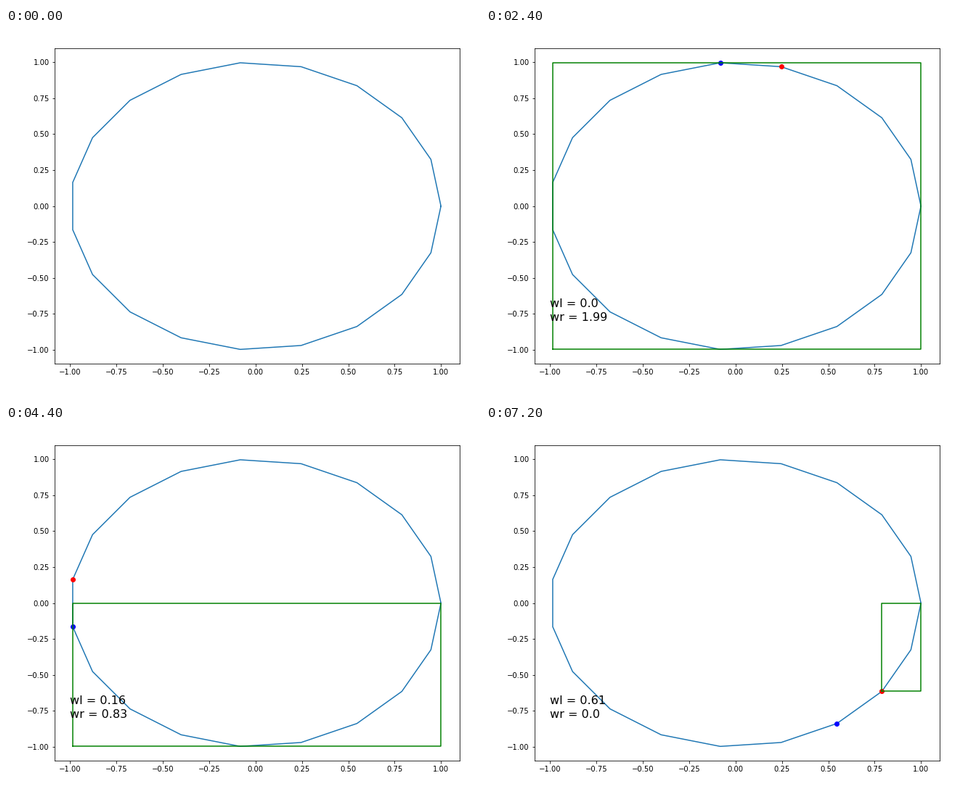
A matplotlib script for the animation above (7600 ms loop, 653x509 px).

```python
import numpy as np
import matplotlib.pyplot as plt
from matplotlib.animation import FuncAnimation

WIDTH, HEIGHT, DPI = 653, 509, 72
FRAMES, INTERVAL = 19, 400
AXES_PX = (66.556, 45.9, 558, 434.88)  # left, bottom, width, height

plt.rcParams.update({
    "font.family": "DejaVu Sans",
    "font.size": 10,
    "figure.dpi": DPI,
})

theta = np.linspace(0, 2 * np.pi, 20)
xs, ys = np.cos(theta), np.sin(theta)


def padded(values, margin=0.05):
    lo, hi = values.min(), values.max()
    pad = margin * (hi - lo)
    return lo - pad, hi + pad


fig = plt.figure(figsize=((WIDTH + 1e-6) / DPI, (HEIGHT + 1e-6) / DPI),
                 facecolor="white")
left, bottom, width, height = AXES_PX
ax = fig.add_axes([left / WIDTH, bottom / HEIGHT,
                   width / WIDTH, height / HEIGHT])
ax.set_xlim(*padded(xs))
ax.set_ylim(*padded(ys))
ax.plot(xs, ys, color="C0", lw=1.5)

red, = ax.plot([], [], "o", color="red", ms=6)
blue, = ax.plot([], [], "o", color="blue", ms=6)
box, = ax.plot([], [], color="green", lw=1.5)
corner, = ax.plot([], [], "o", color="blue", ms=10)
left_label = ax.text(-1, -0.7, "", fontsize=16)
right_label = ax.text(-1, -0.8, "", fontsize=16)


def place(marker, x, y):
    marker.set_data([x], [y])


def clear():
    for line in (red, blue, box, corner):
        line.set_data([], [])
    for label in (left_label, right_label):
        label.set_text("")


def show_widths(wl, wr):
    left_label.set_text(f"wl = {wl}")
    right_label.set_text(f"wr = {wr}")


def update(frame):
    clear()
    if frame == 0:
        return
    cur = frame - 1

    # Bounding box of the points not yet passed
    rest_x, rest_y = xs[cur:], ys[cur:]
    x0, x1 = rest_x.min(), rest_x.max()
    y0, y1 = rest_y.min(), rest_y.max()
    box.set_data([x0, x1, x1, x0, x0], [y0, y0, y1, y1, y0])

    if cur == 0:
        place(red, xs[0], ys[0])
        place(corner, x0, y1)
        show_widths(0, 2)
        return

    # Blue marks the left end of the current edge, red the right end
    lo, hi = cur, cur - 1
    if xs[cur] > xs[cur - 1] + 1e-9:
        lo, hi = hi, lo
    place(blue, xs[lo], ys[lo])
    place(red, xs[hi], ys[hi])

    # Split the box height at the highest point left of the current one
    split = rest_y[rest_x <= xs[cur] + 1e-9].max()
    show_widths(round(float(y1 - split), 2), round(float(split - y0), 2))


anim = FuncAnimation(fig, update, frames=FRAMES, interval=INTERVAL,
                     init_func=clear, repeat=True, repeat_delay=0, blit=False)
plt.show()
```
